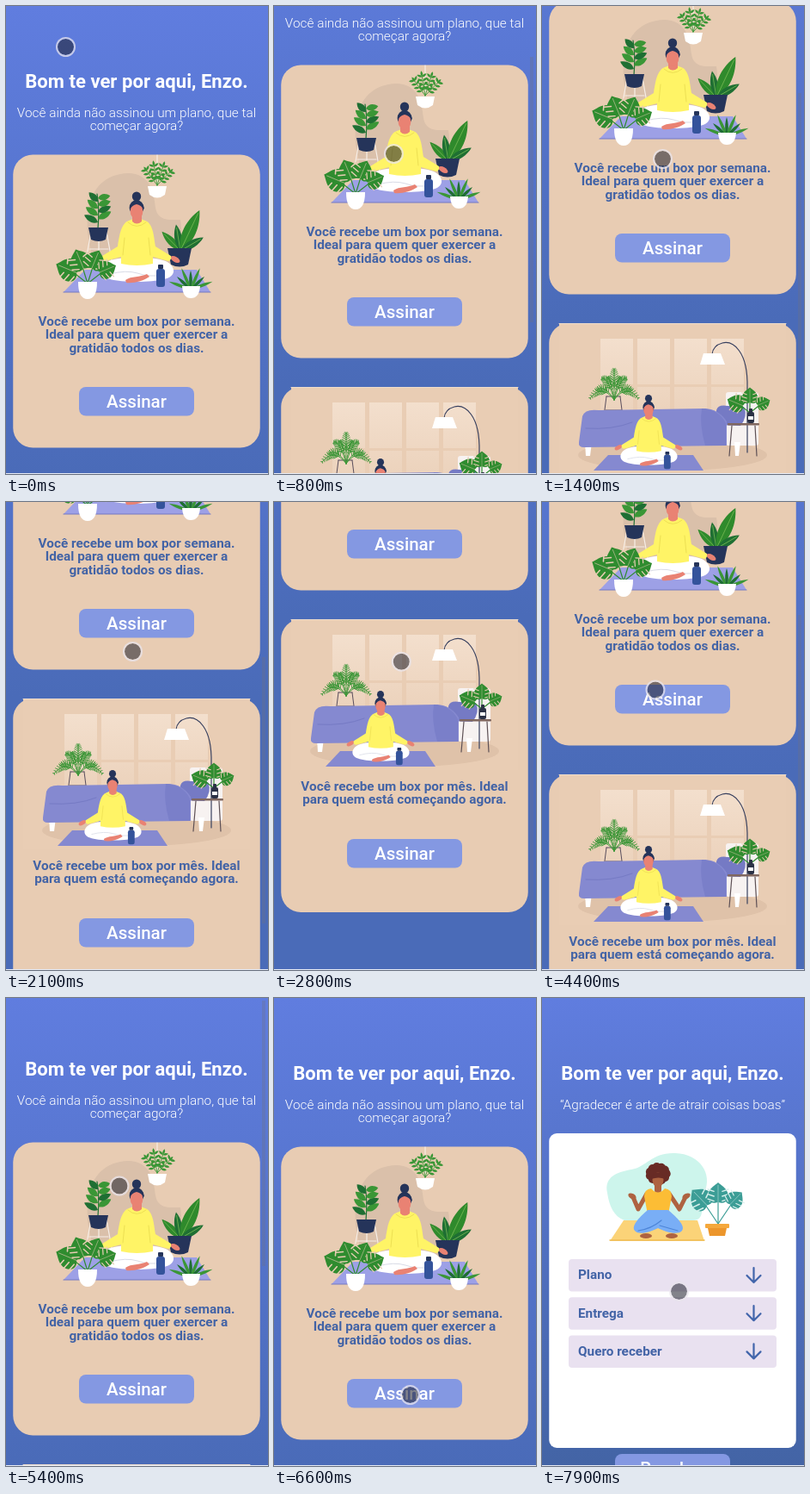
Animation of 305 by 543 pixels, one loop 8000 ms. Source, as an HTML page with a canvas:

```html
<!DOCTYPE html>
<html lang="pt">
<head>
<meta charset="utf-8">
<title>Planos</title>
<style>
html, body { margin: 0; width: 100%; height: 100%; overflow: hidden; }
#stage { position: relative; width: 305px; height: 543px; overflow: hidden; font-family: Roboto, Arial, sans-serif; }
.view { position: absolute; inset: 0; overflow: hidden; }
.page { position: absolute; left: 0; top: 0; width: 305px; }
#scroll { height: 957px; background: linear-gradient(#607ddf, #4a6bb8 543px); }
#still { height: 543px; background: linear-gradient(#607ddf, #4364a5); }
canvas { position: absolute; left: 0; top: 0; }
.t { position: absolute; left: 0; width: 304px; height: 20px; line-height: 20px; text-align: center; white-space: nowrap; }
.title { font-size: 22.1px; font-weight: 700; color: #fff; }
.sub { font-size: 15.35px; font-weight: 300; color: #fff; }
.body { font-size: 15.3px; font-weight: 700; color: #4263a6; }
.btn { font-size: 20.5px; font-weight: 500; color: #fff; }
.row { left: 42px; text-align: left; }
#bar { position: absolute; left: 298px; width: 4px; background: rgba(110, 112, 130, .32); }
#dot { position: absolute; left: -11.5px; top: -11.5px; width: 19px; height: 19px; border: 2px solid rgba(232, 228, 236, .75); border-radius: 50%; background: rgba(28, 30, 42, .55); background-clip: padding-box; }
#edge { position: absolute; left: 0; top: 542px; width: 305px; height: 1px; background: #e4e9f3; }
</style>
</head>
<body>
<div id="stage">
  <div class="view" id="plans"><div class="page" id="scroll"></div><div id="bar"></div></div>
  <div class="view" id="home"><div class="page" id="still"></div></div>
  <div id="edge"></div>
  <div id="dot"></div>
</div>
<script>
const $ = id => document.getElementById(id);
const VIEW = 543, PAGE = 957, LOOP = 8000;
const NAVY = '#25345a', SKIN = '#e98273', WHITE = '#fff', BEIGE = '#e9cdb4';
const GREEN = '#3a9636', DARK = '#1f6f33', LILAC = '#8589d0', SHADE = '#757ac4';
let c;

function surface(host, h) {
  const el = document.createElement('canvas'), k = Math.max(1, devicePixelRatio || 1);
  el.width = 305 * k; el.height = h * k;
  el.style.width = '305px'; el.style.height = h + 'px';
  host.appendChild(el);
  c = el.getContext('2d');
  c.scale(k, k);
}

function label(host, str, y, kind) {
  const el = document.createElement('div');
  el.className = 't ' + kind;
  el.textContent = str;
  el.style.top = y - 10 + 'px';
  host.appendChild(el);
}

// drawing helpers
function fill(d, color) { c.fillStyle = color; c.fill(new Path2D(d)); }
function line(d, color, w = 1) {
  c.strokeStyle = color; c.lineWidth = w; c.lineCap = c.lineJoin = 'round';
  c.stroke(new Path2D(d));
}
function box(x, y, w, h, r, color) {
  c.fillStyle = color; c.beginPath(); c.roundRect(x, y, w, h, r); c.fill();
}
function oval(x, y, rx, ry, color, a = 0) {
  c.fillStyle = color; c.beginPath(); c.ellipse(x, y, rx, ry, a, 0, 7); c.fill();
}
function at(x, y, deg, draw, s = 1) {
  c.save(); c.translate(x, y); c.rotate(deg * Math.PI / 180); c.scale(s, s); draw(); c.restore();
}
// calls draw with n values spread evenly over -1..1
function spread(n, draw) {
  for (let i = 0; i < n; i++) draw(i / (n - 1) * 2 - 1, i);
}

// plants; 0 degrees points up
function leaf(x, y, deg, len, w, color) {
  at(x, y, deg, () => fill(`M0 0C${-w} ${-len * .3} ${-w * .8} ${-len * .7} 0 ${-len}C${w * .8} ${-len * .7} ${w} ${-len * .3} 0 0Z`, color));
}
function sprig(x, y, deg, len, size, color) {
  at(x, y, deg, () => {
    line(`M0 0V${-len}`, color, .8);
    for (let d = len * .3; d < len; d += size * .75)
      for (const s of [-1, 1]) leaf(0, -d, s * 60, size, size * .3, color);
    leaf(0, -len + 2, 0, size, size * .3, color);
  });
}
function fern(x, y, n, w, h, color) {
  spread(n, (u, i) => {
    const rise = h * (1 - .3 * u * u) * (i % 2 ? .8 : 1), drop = 2.3 * u * u;
    const point = v => [x + u * w * v, y - rise * (2 * v - v * v * (.7 + drop * .55))];
    for (let v = .08; v <= 1; v += .08) {
      const [a, b] = point(v), [p, q] = point(v - .08);
      const dir = Math.atan2(b - q, a - p), r = 6 * Math.sin(Math.PI * (.2 + .75 * v));
      line(`M${p} ${q}L${a} ${b}`, color, .8);
      if (v > .3) for (const s of [-1, 1])
        line(`M${a} ${b}l${r * Math.cos(dir + s)} ${r * Math.sin(dir + s)}`, color, .9);
    }
  });
}
function monstera(x, y, deg, s, color, gap) {
  at(x, y, deg, () => {
    fill('M0 8C-10 14 -17 4 -14 -5C-11 -13 -4 -16 0 -20C4 -16 11 -13 14 -5C17 4 10 14 0 8Z', color);
    for (const m of [-1, 1])
      for (const v of [-8, -1, 6]) line(`M${m * 15} ${v - 2}L${m * 6} ${v + 1}`, gap, 1.7);
    line('M0 8V-16', gap, .6);
  }, s);
}
function bush(x, y, n, angle, r, s, color, gap) {
  spread(n, u => {
    const a = u * angle * Math.PI / 180, px = x + r * Math.sin(a), py = y - r * Math.cos(a);
    line(`M${x} ${y}L${px} ${py}`, color, 1.2);
    monstera(px, py, u * angle * 1.3, s * (1 - .12 * u), color, gap);
  });
}

function bottle(x, y) {
  box(x - 5, y - 21, 10, 21, 3, '#34539b');
  box(x - 3, y - 26, 6, 5, 1, NAVY);
}

function yogi() {
  fill('M119 296C107 302 107 314 121 317C136 321 168 321 184 317C199 314 198 302 186 296C170 290 135 290 119 296Z', WHITE);
  line('M121 311Q140 306 153 310Q166 315 184 312', '#d9dbe6', 1);
  fill('M139 318C146 313 156 315 164 311L167 314C160 319 149 322 140 321Z', SKIN);
  oval(107, 294, 6, 3, SKIN, -.5);
  oval(197, 294, 6, 3, SKIN, .5);
  fill('M143 249C134 252 132 266 130 279L112 290Q111 295 115 296L134 291V299Q152 303 171 299V291L189 296Q193 295 192 290L174 279C172 266 171 252 162 249Q152 244 143 249Z', '#fff466');
  line('M136 289L138 269M168 289L166 269M142 251Q152 260 163 251', '#e8da4e', .8);
  oval(152, 221, 5.2, 5.5, NAVY);
  oval(152, 234, 8.4, 9, NAVY);
  fill('M147 240H158V250Q152 255 147 250Z', SKIN);
  oval(152, 238, 7.4, 9.2, SKIN);
  fill('M144 236C144 223 160 223 161 236Q157 231 152 230Q147 231 144 236Z', NAVY);
  bottle(180, 326);
}

function gardenScene() {
  fill('M104 300C86 250 92 196 142 194C168 194 172 216 174 234Q176 247 190 248H203Q206 262 200 300Z', '#dac0aa');
  // hanging pot
  line('M176 173V210', WHITE, .8);
  spread(4, u => sprig(176, 208, 4 + 40 * u, 25 - 3 * u * u, 6.5, GREEN));
  fill('M165 209H187L185 219Q176 226 167 219Z', WHITE);
  // plant stand
  line('M99 262L93 295M117 262L123 295M108 270V290M97 282H119', '#f7eee7', 1.2);
  line('M107 258Q109 235 106 218', DARK, 1.2);
  for (let i = 0; i < 8; i++) leaf(107, 251 - 4 * i, (i % 2 ? 58 : -62) + 3 * i, 18 - .5 * i, 5.5, i % 3 ? GREEN : DARK);
  fill('M96 257H119L116 271Q108 275 99 271Z', NAVY);
  // tall leaves on the right
  spread(4, (u, i) => {
    const a = 8 + 52 * u, len = i === 2 ? 52 : 31;
    leaf(203, 284, a, len, len * .21, i % 2 ? DARK : '#2f8a2c');
    at(203, 284, a, () => line(`M0 0V${4 - len}`, '#73b653', .8));
  });
  fill('M188 281H216L212 300Q202 305 192 300Z', NAVY);
  fill('M92 306H222L238 332H67Z', '#9da0e6');
  line('M67 332H238', SHADE, 1.2);
  yogi();
  bush(95, 322, 4, 52, 25, .82, '#2f8c2f', BEIGE);
  fill('M84 320H106Q106 340 95 340Q84 340 84 320Z', WHITE);
  spread(7, (u, i) => leaf(215, 329, 70 * u, 27 - 5 * (i % 2), 2.7, i % 2 ? DARK : GREEN));
  fill('M205 325H226Q225 339 215 339Q206 339 205 325Z', WHITE);
}

// coordinates with the card top at 0
function bedroomScene() {
  box(20, 0, 264, 175, 0, BEIGE);
  line('M20 .5H284', '#eedccb', 1);
  const g = c.createLinearGradient(0, 18, 0, 112);
  g.addColorStop(0, '#f3dfcd'); g.addColorStop(1, '#ebd1ba');
  for (let x = 68; x < 200; x += 43) {
    box(x, 18, 38, 53, 0, g);
    box(x, 74, 38, 36, 0, g);
  }
  oval(152, 153, 110, 18, '#dfc2a9');
  line('M75 85L71 116M91 85L95 116M75 85H91M74 101H93', '#594d5c', 1);
  fern(84, 89, 9, 29, 28, GREEN);
  // bed
  box(214, 80, 38, 62, 3, '#f7f2f1');
  fill('M50 138H58L56 154H51ZM224 138H231L229 154H225Z', WHITE);
  fill('M203 101Q205 94 216 96L235 97Q240 108 231 119L203 118Z', SHADE);
  fill('M47 108Q50 99 66 101L190 99Q206 100 215 114V142L49 144Q42 144 43 138Z', LILAC);
  fill('M186 99Q206 100 214 116V142H190Q183 118 186 99Z', '#7a7fc9');
  line('M51 122Q82 124 105 115', SHADE, 1);
  // lamp
  line('M239 150V75C240 32 222 20 210 23Q199 26 198 36', '#38405f', 1.2);
  fill('M188 35H208L213 48H184Z', WHITE);
  // side table
  box(216, 116, 37, 2.5, 1, '#80675f');
  line('M221 119L218 154M248 119L250 154', '#5d5055', 1.2);
  bush(242, 104, 3, 52, 17, .62, '#2f8c2f', BEIGE);
  box(239, 103, 8, 13, 2, '#2b3145');
  box(241, 99, 4, 5, 1, '#2b3145');
  box(240, 108, 6, 4, 0, WHITE);
  fill('M77 153H176L188 171H60Z', LILAC);
  at(124, 163, 0, () => { c.translate(-152, -318); yogi(); }, .78);
}

function homeScene() {
  fill('M76 226C72 207 88 202 104 199C122 196 128 179 155 180C184 181 199 204 189 226C183 240 192 257 176 258H96C84 254 78 241 76 226Z', '#cdf5ec');
  fill('M95 258H181L189 282H79Z', '#fbd378');
  line('M79 281H189', '#f0bd55', 1.5);
  const skin = '#ae6341', hair = '#682b25';
  for (let a = 0; a < 6.28; a += .57) oval(135 + 9.5 * Math.cos(a), 204 + 8 * Math.sin(a), 5, 5, hair);
  oval(135, 204, 10, 9, hair);
  line('M122 227L112 245L106 231M148 227L160 245L167 231', skin, 5);
  oval(105, 230, 5, 3, skin, .5);
  oval(168, 230, 5, 3, skin, -.5);
  box(131, 214, 8, 12, 3, skin);
  fill('M127 221Q135 230 143 221Q151 222 151 230L147 251H123L119 230Q119 222 127 221Z', '#fcbd35');
  oval(135, 211, 6.5, 8.5, skin);
  fill('M127 210C128 200 142 200 143 210Q136 207 127 210Z', hair);
  oval(121, 276, 7, 3, skin);
  oval(151, 276, 7, 3, skin);
  fill('M123 246H147C154 252 168 264 163 270C158 276 143 271 135 267C127 271 113 276 108 270C103 264 116 252 123 246Z', '#79aef6');
  line('M112 270Q127 268 139 258M158 270L137 264', '#4d85d8', 1.2);
  bush(205, 262, 3, 34, 32, .8, '#3c9d96', '#d9f0ec');
  box(190, 262, 28, 5, 1, '#f5a83c');
  fill('M193 267H215L213 276H195Z', '#ec962c');
}

function build() {
  const list = $('scroll'), home = $('still'), title = 'Bom te ver por aqui, Enzo.';
  const card = (top, h, r, color) => box(8.25, top, 287.5, h, r, color);
  const button = y => box(85, y, 134, 33.5, 8, '#8498e2');
  const lines = (y, ...rows) => rows.forEach((s, i) => label(list, s, y + 15.4 * i, 'body'));

  surface(list, PAGE);
  card(172.5, 340, 23, '#e8ccb3');
  card(546, 340, 23, '#e8ccb3');
  gardenScene();
  at(0, 546, 0, bedroomScene);
  button(442);
  button(801);
  label(list, title, 87, 'title');
  label(list, 'Você ainda não assinou um plano, que tal', 124, 'sub');
  label(list, 'começar agora?', 139, 'sub');
  lines(366, 'Você recebe um box por semana.', 'Ideal para quem quer exercer a', 'gratidão todos os dias.');
  lines(740, 'Você recebe um box por mês. Ideal', 'para quem está começando agora.');
  label(list, 'Assinar', 459, 'btn');
  label(list, 'Assinar', 818, 'btn');

  surface(home, VIEW);
  card(157, 365, 9, WHITE);
  homeScene();
  button(529);
  label(home, title, 87, 'title');
  label(home, '“Agradecer é arte de atrair coisas boas”', 124, 'sub');
  ['Plano', 'Entrega', 'Quero receber'].forEach((s, i) => {
    const y = 303 + 44.2 * i;
    box(31, y, 242, 37.5, 4, '#e9e1f0');
    line(`M246.5 ${y + 10}v17m-8 -8l8 8l8 -8`, '#4265ab', 2.2);
    label(home, s, y + 18.3, 'body row');
  });
  label(home, 'Receber', 545.5, 'btn');
}

// motion: key points as [time, value, ...]
const scrollKeys = [[400, 0], [800, 104], [1100, 116], [1400, 178], [2100, 318], [2500, 410],
  [3300, 410], [3800, 331], [4400, 230], [4700, 160], [4900, 160], [5400, 5], [5600, 0]];
const dotKeys = [[100, 69, 47], [300, 138, 166], [1400, 140, 177], [2100, 147, 173], [3000, 148, 188],
  [3800, 137, 197], [4400, 131.5, 217.5], [5700, 131.5, 217.5], [6600, 158, 460], [7400, 158, 460], [7700, 158, 353], [7900, 159, 340]];

function track(keys, t, i = 1) {
  const n = keys.findIndex(k => t < k[0]);
  if (n < 1) return (n ? keys[keys.length - 1] : keys[0])[i];
  const a = keys[n - 1], b = keys[n];
  return a[i] + (b[i] - a[i]) * (t - a[0]) / (b[0] - a[0]);
}

// the scrollbar shows from one time on and fades out before another
function fade(t, from, to) {
  return t < from ? 0 : Math.max(0, Math.min(1, (to - t) / 500));
}

function show(now) {
  // motion advances ten times a second
  const t = Math.floor(now % LOOP / 100) * 100;
  const y = Math.round(track(scrollKeys, t)), k = VIEW / PAGE;
  $('scroll').style.transform = `translateY(${-y}px)`;
  $('bar').style.cssText = `top:${y * k}px;height:${VIEW * k}px;opacity:${fade(t, 500, 3200) * (t < 3300) + fade(t, 3400, 6200)}`;
  $('home').style.visibility = t >= 7200 ? 'visible' : 'hidden';
  $('dot').style.transform = `translate(${track(dotKeys, t)}px,${track(dotKeys, t, 2)}px)`;
}

build();
const start = performance.now();
function tick() {
  show(performance.now() - start);
  requestAnimationFrame(tick);
}
tick();
</script>
</body>
</html>
```
